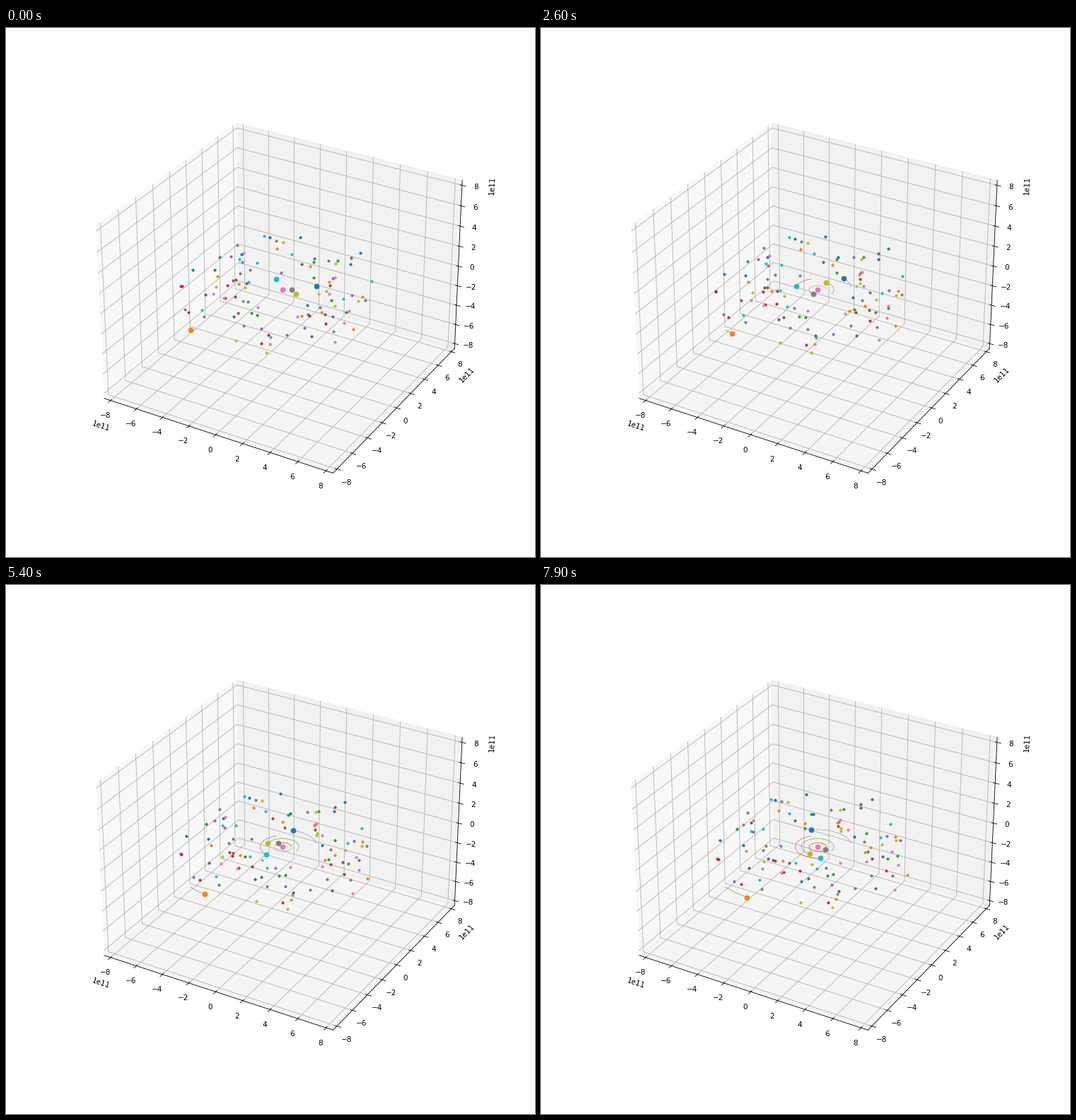
Animation, 748 px wide and 748 px high, one loop 8000 ms. Source, as a matplotlib script:

```python
import numpy as np
import matplotlib.pyplot as plt
from matplotlib.animation import FuncAnimation

FRAMES, STEP_MS = 80, 100
LIMIT = 8.5e11
UNIT = 1e11
KEPLER = 3.776            # degrees per frame at a radius of one unit
ROCKS = 100

# Planets: radius, start angle, eccentricity, perihelion angle
PLANETS = [
    (0.578, 43, 0.12, 130),
    (1.055, -3, 0, 0),
    (1.455, 136.3, 0, 0),
    (2.235, 41.4, 0, 0),
    (7.70, 251.1, 0, 0),
]


def rate(radius):
    return KEPLER / radius ** 1.5


def polar(radius, degrees):
    angle = np.radians(degrees)
    return radius * np.cos(angle) * UNIT, radius * np.sin(angle) * UNIT


def planet(t, radius, start, ecc, peri):
    """Flat orbit, with the first-order equation of the centre."""
    mean = np.radians(start - peri + rate(radius) * t)
    true = mean + 2 * ecc * np.sin(mean)
    r = radius * (1 - ecc ** 2) / (1 + ecc * np.cos(true))
    x, y = polar(r, np.degrees(true) + peri)
    return x, y, np.zeros_like(x)


# Asteroid belt: circular orbits, each slightly tilted about its own node
rng = np.random.default_rng(7)
radii = rng.uniform(2.4, 7.2, ROCKS)
starts = rng.uniform(0, 360, ROCKS)
tilts = rng.uniform(0, 0.14, ROCKS)
nodes = rng.uniform(0, 360, ROCKS)


def belt(t):
    angles = starts + rate(radii) * t
    x, y = polar(radii, angles)
    z = radii * tilts * np.sin(np.radians(angles - nodes)) * UNIT
    return x, y, z


fig = plt.figure(figsize=(10, 10), dpi=74.8)
ax = fig.add_subplot(projection="3d")
for set_limits in (ax.set_xlim, ax.set_ylim, ax.set_zlim):
    set_limits(-LIMIT, LIMIT)


def dots(color, size):
    return ax.plot([], [], [], "o", color=f"C{color % 10}", markersize=size)[0]


trails = [ax.plot([], [], [], color=f"C{i + 1}", lw=0.5)[0]
          for i in range(len(PLANETS))]
sun = dots(6, 6.4)
sun.set_data_3d([0], [0], [0])
bodies = [dots(7 + i, 6.4) for i in range(len(PLANETS))]
swarm = [dots(2 + i, 3) for i in range(10)]


def update(frame):
    past = np.linspace(0, frame, 4 * frame + 1)
    for trail, body, params in zip(trails, bodies, PLANETS):
        path = planet(past, *params)
        trail.set_data_3d(*path)
        body.set_data_3d(*(p[-1:] for p in path))
    rocks = belt(frame)
    for i, group in enumerate(swarm):
        group.set_data_3d(*(p[i::10] for p in rocks))
    return trails + bodies + swarm


anim = FuncAnimation(fig, update, frames=FRAMES, interval=STEP_MS,
                     init_func=lambda: update(0), repeat=True, repeat_delay=0)
plt.show()
```
